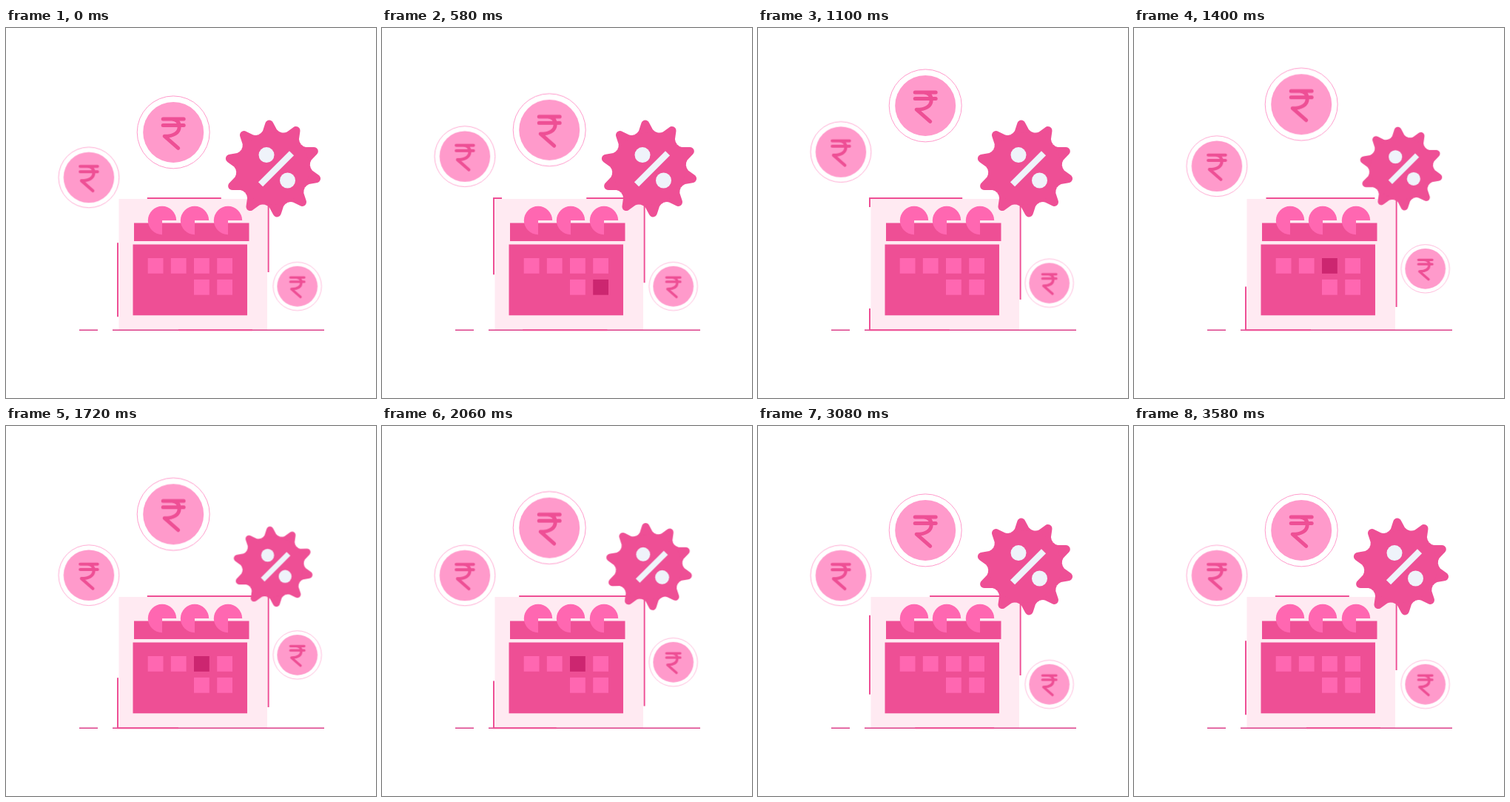
Animation, 500 px wide and 500 px high, one loop 3600 ms. Source, as an HTML page without scripts:

```html
<!DOCTYPE html>
<html lang="en">
<head>
<meta charset="utf-8">
<title>Payment calendar</title>
<style>
  html, body { margin: 0; width: 100%; height: 100%; overflow: hidden; background: #fff; }
  svg { display: block; width: 100%; height: 100%; }

  .main { fill: #ee4f95; }
  .mid { fill: #ff67b1; }
  .pale { fill: #ff9acb; }
  .white { fill: #eff3fa; }
  .line { fill: none; stroke: #ee4f95; }

  .frame, .coin, .badge, .day {
    animation: 3600ms cubic-bezier(.333, 0, .667, 1) infinite;
  }
  .frame { animation-name: dashes; }
  .coin.left { animation-name: hop-left; }
  .coin.top { animation-name: hop-top; }
  .coin.right { animation-name: hop-right; }
  .badge { animation-name: pop; }
  .day { animation-timing-function: step-end; }
  .day.last { animation-name: mark-last; }
  .day.third { animation-name: mark-third; }

  @keyframes dashes {
    0%, 100% { stroke-dasharray: 100px, 100px; }
    45.83% { stroke-dasharray: 150px, 150px; }
    51.39% { stroke-dasharray: 150px, 150px; animation-timing-function: cubic-bezier(.44, 0, .48, 1); }
  }
  @keyframes hop-left {
    0%, 49.08%, 100% { transform: translateY(0); }
    25% { transform: translateY(-40px); }
  }
  @keyframes hop-top {
    0%, 12.14%, 62.08%, 100% { transform: translateY(0); }
    35.06% { transform: translateY(-40px); }
  }
  @keyframes hop-right {
    0%, 25.83%, 74.08%, 100% { transform: translateY(0); }
    49.08% { transform: translateY(-40px); }
  }
  @keyframes pop {
    0%, 31.94%, 68.06%, 100% { transform: scale(1); }
    41.67%, 54.72% { transform: scale(.83); }
    62.22% { transform: scale(1.1); }
  }
  @keyframes mark-last {
    0%, 25%, 100% { fill: #ff67b1; }
    8.33% { fill: #cc2670; }
  }
  @keyframes mark-third {
    0%, 62.04%, 100% { fill: #ff67b1; }
    35.19% { fill: #cc2670; }
  }
</style>
</head>
<body>
<svg viewBox="0 0 500 500">
  <defs>
    <g id="coin">
      <circle r="49" fill="none" stroke="#ff9acb"/>
      <circle r="41" class="pale"/>
      <path class="line" stroke-width="5" stroke-linecap="round" stroke-linejoin="round"
        d="M-14 -18H14M-14 -9.3H14M-2 -18C5 -17.5 8 -13 8 -8C8 1 0 5.3 -12 5.3L6.5 21.5"/>
    </g>
    <path id="ring" class="mid" d="M0 0V19.2A19.2 19.2 0 1 1 19.2 0Z"/>
    <rect id="day" width="20.8" height="20.8"/>
    <path id="tip" d="M0 0L-15.5 -47.6Q-11.7 -48.8 -9.5 -52L-5.5 -61.5C-3.5 -67 3.5 -67 5.5 -61.5L9.5 -52Q11.7 -48.8 15.5 -47.6Z"/>
    <g id="tips">
      <use href="#tip"/>
      <use href="#tip" transform="rotate(36)"/>
      <use href="#tip" transform="rotate(72)"/>
      <use href="#tip" transform="rotate(108)"/>
      <use href="#tip" transform="rotate(144)"/>
    </g>
  </defs>

  <rect x="152.5" y="231" width="200.5" height="177" fill="#ffeaf2"/>
  <path d="M99 408.2H124M144 408.2H430" stroke="#dc3f8a" stroke-width="1.5"/>
  <path class="line frame" stroke-width="2" d="M354.6 230V408.3H151V230Z"/>

  <rect class="main" x="173" y="263.5" width="155.5" height="24.5"/>
  <rect class="main" x="171.5" y="292.5" width="154.5" height="95.8"/>
  <use href="#ring" x="211" y="260"/>
  <use href="#ring" x="255" y="260"/>
  <use href="#ring" x="300" y="260"/>
  <g class="mid">
    <use href="#day" x="191.7" y="311"/>
    <use href="#day" x="222.8" y="311"/>
    <use href="#day" class="day third" x="254" y="311"/>
    <use href="#day" x="285.2" y="311"/>
    <use href="#day" x="254" y="339.9"/>
    <use href="#day" class="day last" x="285.2" y="339.9"/>
  </g>

  <g class="coin left"><use href="#coin" transform="translate(112 202) scale(.835)"/></g>
  <g class="coin top"><use href="#coin" transform="translate(226.2 140.9)"/></g>
  <g class="coin right"><use href="#coin" transform="translate(393.7 349.1) scale(.667)"/></g>

  <g transform="translate(361 190)">
    <g class="badge">
      <g class="main" transform="rotate(-5)">
        <use href="#tips"/>
        <use href="#tips" transform="rotate(180)"/>
        <circle r="49"/>
      </g>
      <circle class="white" cx="-9" cy="-18.4" r="10.5"/>
      <circle class="white" cx="19.5" cy="16" r="10.5"/>
      <path d="M-17 21.2L25 -20.8" stroke="#eff3fa" stroke-width="8.6"/>
    </g>
  </g>
</svg>
</body>
</html>
```
